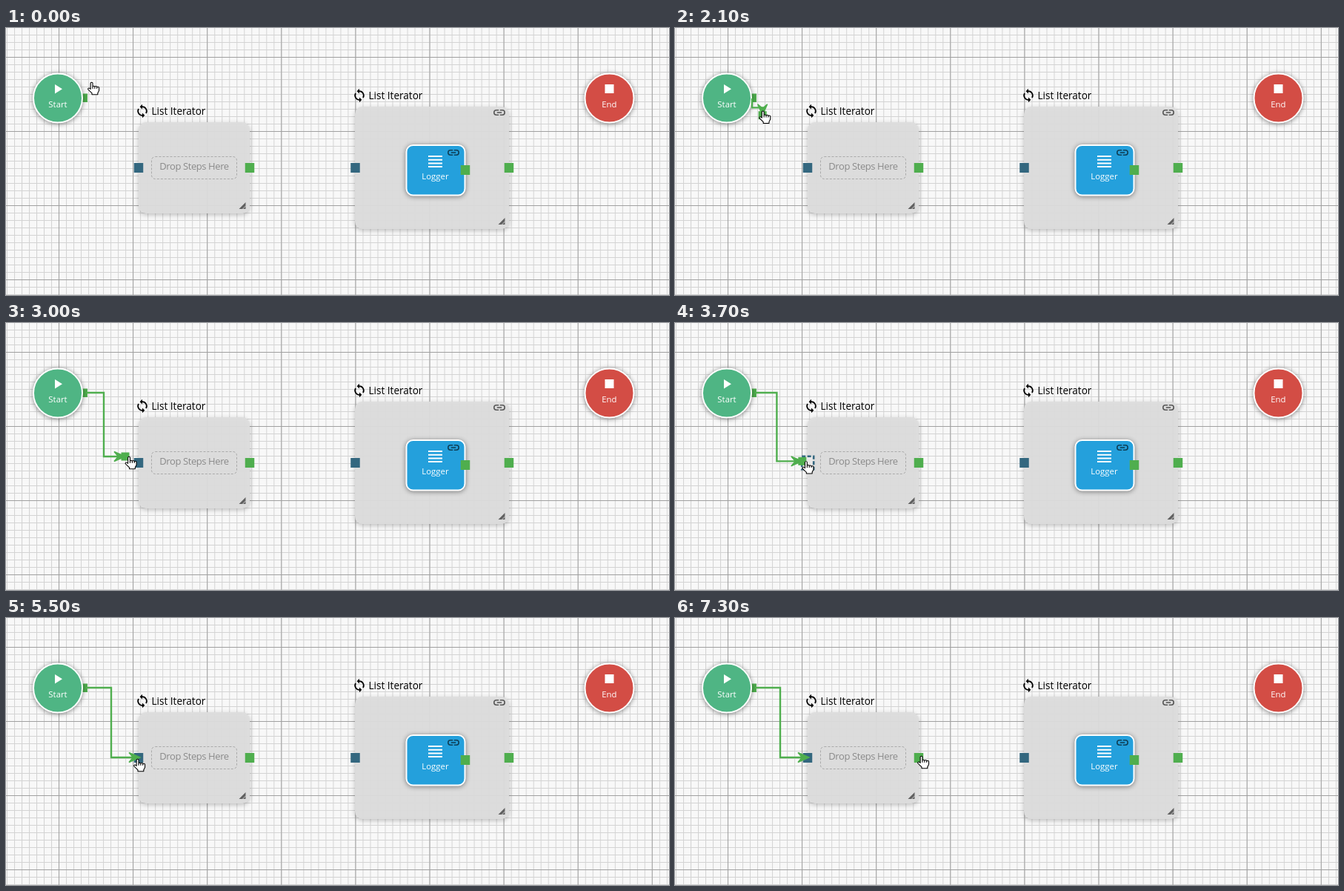
An HTML page that plays this animation: 895 px wide and 360 px high, repeating every 8 s.

```html
<!DOCTYPE html>
<html lang="en">
<head>
<meta charset="utf-8">
<title>Flow editor</title>
<style>
  html, body { margin: 0; width: 100%; height: 100%; overflow: hidden; background: #f8f8f8; }
  svg { display: block; width: 895px; height: 360px; }
  text { font-family: "Open Sans", "Noto Sans", sans-serif; font-weight: 500; }
  .title { font-size: 13.6px; fill: #000; }
  .label { font-size: 11.4px; fill: #fff; text-anchor: middle; }
  .hint { font-size: 13px; font-weight: 400; letter-spacing: -.4px; fill: #8a8a8a; text-anchor: middle; }
  .box { fill: #dedede; fill-opacity: .94; filter: drop-shadow(0 2px 3px rgba(0, 0, 0, .25)); }
  .box.raised { filter: drop-shadow(0 4px 5px rgba(0, 0, 0, .45)); }
  .node { stroke: #fff; stroke-width: 2; filter: drop-shadow(0 1px 3px rgba(0, 0, 0, .45)); }
  .out { fill: #4fae4e; }
  .in { fill: #33677f; }
  .wire { fill: none; stroke: #4fae4e; stroke-width: 2.4; }
  .chain { fill: none; stroke: #000; stroke-opacity: .6; stroke-width: 2; }
</style>
</head>
<body>
<svg viewBox="0 0 895 360">
  <defs>
    <pattern id="minor" x="1" y="9" width="10.01" height="10" patternUnits="userSpaceOnUse">
      <path d="M0 0H11V1H1V10H0Z" fill="#d3d3d3"/>
    </pattern>
    <pattern id="major" x="71" y="39" width="100.1" height="100" patternUnits="userSpaceOnUse">
      <path d="M0 0H101V1H1V100H0Z" fill="#a0a0a0"/>
    </pattern>
    <g id="turn">
      <path d="M12 5a7 7 0 0 1 6 10.6" fill="none" stroke="#000" stroke-width="2.1"/>
      <path d="M12 1L8 5L12 9Z"/>
    </g>
    <g id="cycle" transform="scale(.833)">
      <use href="#turn"/>
      <use href="#turn" transform="rotate(180 12 12)"/>
    </g>
    <path id="loop" d="M-1 -4H-5a4 4 0 0 0 0 8H-1"/>
    <g id="chain" class="chain" transform="scale(.8)">
      <use href="#loop"/>
      <use href="#loop" transform="rotate(180)"/>
      <path d="M-4 0H4"/>
    </g>
    <rect id="port" x="-6.25" y="-6.5" width="12.5" height="13"/>
    <g id="grip">
      <path d="M9 0V9H0Z" fill="#606060"/>
      <path d="M4.5 9.5L9.5 4.5" stroke="#d4d4d4"/>
    </g>
  </defs>

  <rect width="895" height="360" fill="#f8f8f8"/>
  <rect width="895" height="360" fill="url(#minor)"/>
  <rect width="895" height="360" fill="url(#major)"/>

  <rect class="out" x="98" y="88.5" width="12" height="11.5"/>
  <circle class="node" cx="70" cy="94.5" r="33" fill="#4fb584"/>
  <path d="M66 76L76 82.3L66 88.6Z" fill="#fff"/>
  <text class="label" x="70" y="107">Start</text>

  <circle class="node" cx="814.5" cy="94.5" r="33" fill="#d34d45"/>
  <rect x="808.5" y="76" width="12" height="12" fill="#fff"/>
  <text class="label" x="814.3" y="107">End</text>

  <rect id="box" class="box" x="179" y="127" width="150" height="123" rx="10"/>
  <use href="#cycle" x="174" y="102"/>
  <text class="title" x="196.5" y="117">List Iterator</text>
  <rect x="196.5" y="173.5" width="115" height="30" rx="5" fill="none" stroke="#aaa" stroke-dasharray="3 2"/>
  <text class="hint" x="254" y="191">Drop Steps Here</text>
  <use href="#grip" x="314.5" y="235"/>
  <use id="solid" class="in" href="#port" x="179" y="188.5"/>
  <rect id="dashed" x="171.2" y="179.7" width="16" height="17.5" fill="#e8e8e8" stroke="#33677f" stroke-width="2.6" stroke-dasharray="5 2.5"/>
  <use class="out" href="#port" x="329" y="188.5"/>

  <rect class="box" x="471" y="106" width="208" height="165" rx="10"/>
  <use href="#cycle" x="467" y="81"/>
  <text class="title" x="489.5" y="96">List Iterator</text>
  <use href="#chain" x="666" y="114"/>
  <use href="#grip" x="664.5" y="256"/>
  <use class="in" href="#port" x="471.5" y="188.5"/>
  <use class="out" href="#port" x="679" y="188.5"/>

  <rect class="node" x="540.5" y="158" width="79" height="67.5" rx="9" fill="#24a0dc"/>
  <path d="M570 173h19m-19 4.7h19m-19 4.7h19m-19 4.7h19" stroke="#fff" stroke-width="2"/>
  <use href="#chain" x="604" y="168"/>
  <text class="label" x="579.5" y="204">Logger</text>
  <use class="out" href="#port" x="620" y="191.5"/>

  <g id="connector">
    <path id="wire" class="wire"/>
    <path id="arrow" class="out" stroke="#4fae4e" stroke-width="1.4" d="M0 0L-15 -6.5L-9.5 0L-15 6.5Z"/>
    <rect id="plug" class="out" x="-5.5" y="-5.5" width="11" height="11"/>
  </g>

  <g id="hand">
    <path transform="translate(-.8 .6) scale(1.1 .98)" fill="#fff" stroke="#000" stroke-linejoin="round"
      d="M4.5 10V2a1.3 1.3 0 0 1 2.6 0V9V7a1.3 1.3 0 0 1 2.6 0V9V7.4a1.3 1.3 0 0 1 2.6 0V9V8.2a1.3 1.3 0 0 1 2.6 0V12L13.3 15.4V17.5H6.2V15.6L1.6 10.6a1.2 1.2 0 0 1 1.8 -1.6Z"/>
  </g>
  <path id="resize" d="M-8.5 0L-3 -4V4ZM8.5 0L3 -4V4Z" fill="#000" stroke="#fff" paint-order="stroke"/>
</svg>
<script>
  const LOOP = 8000, STEP = 100;
  const GRAB = 2000, ALIGN = 2900, HOVER = 3100, DROP = 5500;
  const ENTER = 6000, EDGE = 6300, EDGE_END = 6600, LEAVE = 6800;

  // Pointer moves; it rests between them
  const home = { x: 110, y: 72 };
  const moves = [
    { from: 0, to: 100, x: 109, y: 74 },
    { from: 500, to: 900, x: 105, y: 86 },
    { from: 1000, to: 1400, x: 104, y: 95 },
    { from: 1900, to: 2600, x: 136, y: 150 },
    { from: 2600, to: 2800, x: 150, y: 177 },
    { from: 2800, to: 3200, x: 171, y: 181 },
    { from: 3600, to: 3900, x: 172, y: 194 },
    { from: 4200, to: 4500, x: 172, y: 189 },
    { from: 5900, to: EDGE, x: 321.5, y: 216 },
    { from: EDGE, to: LEAVE, x: 328, y: 188 },
    { from: LEAVE, to: 7300, x: 327, y: 185 }
  ];

  const el = id => document.getElementById(id);
  const show = (id, on) => { el(id).style.display = on ? "" : "none"; };
  const place = (id, x, y, turn = 0) =>
    el(id).setAttribute("transform", `translate(${x} ${y}) rotate(${turn})`);

  function pointer(t) {
    let { x, y } = home;
    for (const m of moves) {
      const p = Math.min(1, Math.max(0, (t - m.from) / (m.to - m.from)));
      x += (m.x - x) * p;
      y += (m.y - y) * p;
    }
    return [x, y];
  }

  function connect(t, x, y) {
    let path, end, turn = 0;
    if (t < ALIGN) {
      end = [x + 5, y + 7];
      path = `M104 95V${(97 + end[1]) / 2}H${end[0]}V${end[1] - 6}`;
      turn = 90;
    } else {
      end = t < DROP ? [x + .5, y + 1] : [181, 188];
      path = `M108 94H${(103 + end[0]) / 2}V${end[1]}H${end[0] - 6}`;
    }
    el("wire").setAttribute("d", path);
    place("arrow", ...end, turn);
    place("plug", ...end);
  }

  function draw(now) {
    const t = Math.floor((now % LOOP) / STEP) * STEP;
    const within = (a, b) => t >= a && t < b;
    const [x, y] = pointer(t);
    const edge = within(EDGE, EDGE_END);
    show("connector", t >= GRAB);
    show("plug", t < DROP);
    show("dashed", within(HOVER, DROP));
    show("solid", !within(HOVER, DROP));
    show("hand", !edge);
    show("resize", edge);
    el("box").classList.toggle("raised", within(ENTER, LEAVE));
    place(edge ? "resize" : "hand", x, y);
    connect(t, x, y);
  }

  const start = performance.now();
  function tick() {
    draw(performance.now() - start);
    requestAnimationFrame(tick);
  }
  tick();
</script>
</body>
</html>
```
